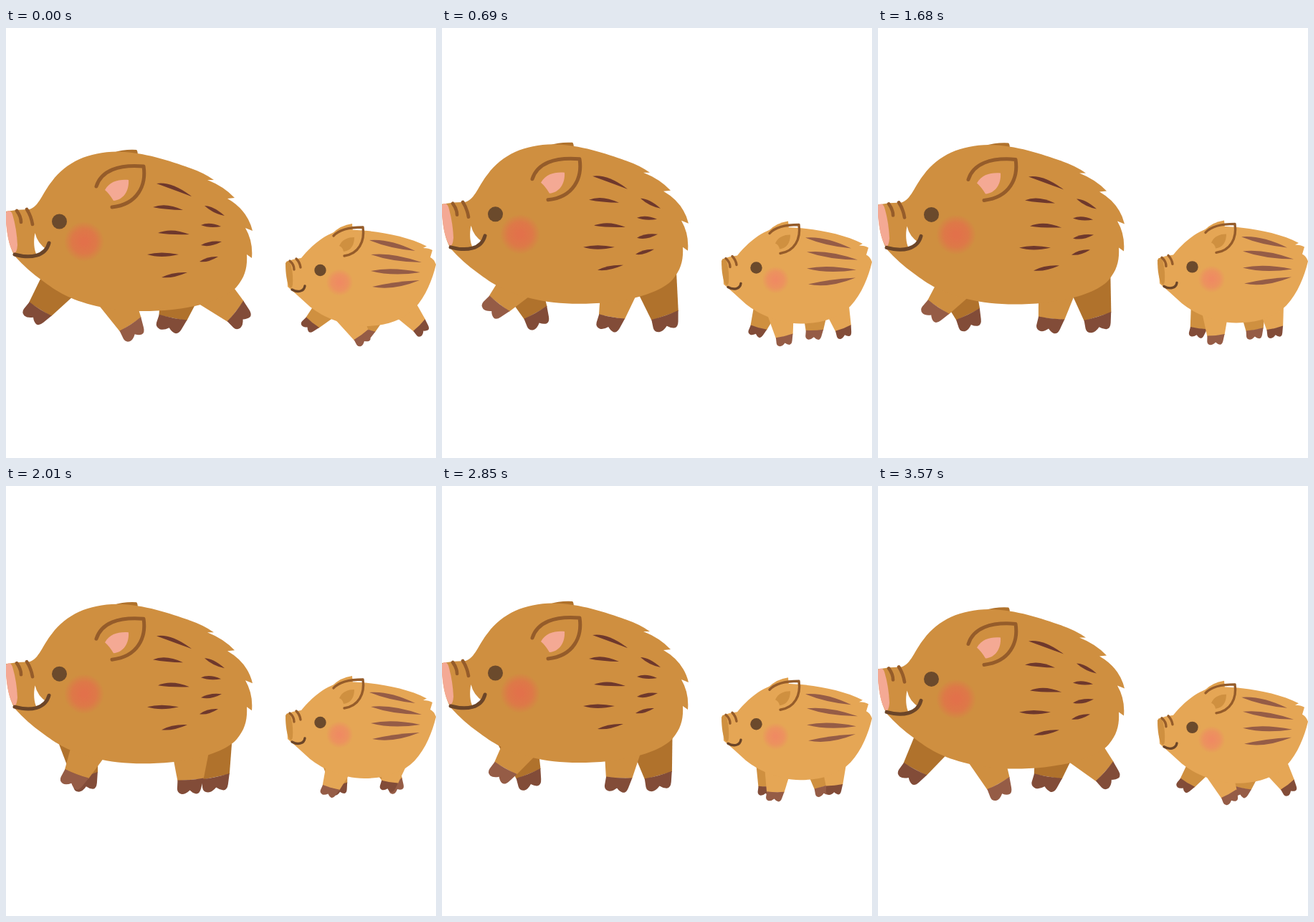
Recreate the animation shown at these times as an HTML page. Size 600 px wide and 600 px high, loop 3600 ms.

```html
<!DOCTYPE html>
<html lang="en">
<head>
<meta charset="utf-8">
<title>Walking boars</title>
<style>
  html, body { margin: 0; width: 100%; height: 100%; overflow: hidden; background: #fff; }
  svg { display: block; width: 100vw; height: 100vh; }
  .line { fill: none; stroke: #955c2a; stroke-linecap: round; stroke-linejoin: round; }
  .mouth { stroke: #6b4528; }
</style>
</head>
<body>
<svg viewBox="0 0 600 600">
  <defs>
    <radialGradient id="blushBig">
      <stop offset=".15" stop-color="#e2714a"/>
      <stop offset=".6" stop-color="#e2714a" stop-opacity=".75"/>
      <stop offset="1" stop-color="#e2714a" stop-opacity="0"/>
    </radialGradient>
    <radialGradient id="blushSmall">
      <stop offset=".1" stop-color="#ef8a62"/>
      <stop offset=".6" stop-color="#ef8a62" stop-opacity=".7"/>
      <stop offset="1" stop-color="#ef8a62" stop-opacity="0"/>
    </radialGradient>
  </defs>

  <g id="parent">
    <g class="legs"></g>
    <path fill="#b0722c" d="M150 174Q164 169 182 170Q184 171 184 180L152 180Z"/>
    <path fill="#cf8f40" d="M0 256Q16 253 33 253C46 249 51 230 64 214C84 187 115 173 155 172.500
      C193 173 230 186 257 195.500Q276 202 290 212L281 212Q304 221 319 237L309 238Q337 254 344 283L334 279
      Q345 298 343 321L336 316C337 333 334 347 322 361C306 379 268 389 232 393C190 397 154 395 126 388
      C88 379 70 367 50 352Q30 338 12 318C4 304 0 285 0 256Z"/>
    <path fill="#f4a994" d="M0 257Q6 252 9 260Q15 280 16 303Q15 315 11 314Q3 304 0 272Z"/>
    <g class="line" stroke-width="4.6">
      <path d="M15 255Q21 263 21 271M29 253Q35 262 37 274"/>
      <path stroke-width="5" d="M126 221C133 199 157 190 192 193C196 219 184 246 148 250"/>
    </g>
    <path fill="#f4a994" d="M138 226C145 214 157 211 171 212C172 227 164 240 150 241Q144 231 138 226Z"/>
    <circle cx="74.500" cy="270" r="10.500" fill="#6b4a2c"/>
    <circle cx="109" cy="298" r="28" fill="url(#blushBig)"/>
    <path fill="#fff" d="M40.500 286C38 297 39 310 43 317Q52 315 57 309Q44 301 40.500 286Z"/>
    <path class="line mouth" stroke-width="5" d="M12 316C34 322 55 319 60 300"/>
    <g class="stripes" fill="#6e382c"></g>
  </g>

  <g id="child">
    <g class="legs"></g>
    <path fill="#e0a04d" d="M455 287Q467 275 483 273L484 284Z"/>
    <path fill="#e5a655" d="M391 326Q401 322 412 321C423 308 441 288 468 282C494 280 552 286 587 304.500
      L582 307Q590 307 595 310L592 320Q597 322 600 330C595 351 586 374 570 391.500C553 409 528 416 500 416
      C468 416 436 400 421 386Q408 374 393 361Z"/>
    <path fill="#cf9040" d="M390 328Q395 321 398 332Q401 345 400 358Q399 364 396 362Q390 352 390 328Z"/>
    <g class="line" stroke-width="3.4">
      <path d="M396 325Q402 330 402 337M405 322Q410 327 411 334"/>
      <path d="M457 290C465 281 479 278 498 278C501 298 492 315 472 318"/>
    </g>
    <path fill="#cf9040" d="M465 304C469 295 477 292 486 292C486 303 481 311 471 312Q470 306 465 304Z"/>
    <circle cx="438.500" cy="338" r="8.200" fill="#6b4a2c"/>
    <circle cx="465.500" cy="355" r="19" fill="url(#blushSmall)"/>
    <path class="line mouth" stroke-width="3.400" d="M399 365C408 370 416 367 417 360"/>
    <g class="stripes" fill="#955c46"></g>
  </g>
</svg>
<script>
const LOOP = 3600, STEP = 30;
const DARK = '#824c38', LIGHT = '#955c46';

function add(parent, d, fill) {
  const path = document.createElementNS('http://www.w3.org/2000/svg', 'path');
  path.setAttribute('d', d);
  if (fill) path.setAttribute('fill', fill);
  return parent.appendChild(path);
}

// Hip at the origin, leg pointing down; w is half the hoof width.
function makeLeg(parent, w, length, height, skin, hoof) {
  const group = parent.appendChild(document.createElementNS('http://www.w3.org/2000/svg', 'g'));
  const top = length - 2.8 * height, left = length + w * .16, right = length - w * .16;
  const at = (x, y) => `${x * w} ${length + y * height} `;
  add(group, `M${-w * 1.9} ${top}L${-w} ${left + 1}L${w} ${right + 1}L${w * 1.35} ${top}Z`, skin);
  add(group, `M${-w} ${left}Q${at(0, .1)}${w} ${right}L${at(.86, .6)}
    Q${at(.78, 1)}${at(.5, 1)}Q${at(.25, .98)}${at(0, .78)}
    Q${at(-.3, 1.1)}${at(-.6, 1.1)}Q${at(-.95, 1.06)}${at(-.98, .75)}Z`, hoof);
  return group;
}

// Each leg: hip x, hip y, start angle, swing, half width, length, far side?, hoof colour.
function makeBoar(id, { period, rise, height, skin, farSkin, legs, stripes }) {
  const root = document.getElementById(id);
  const legRoot = root.querySelector('.legs');
  const parts = legs.map(([x, y, start, swing, w, length, far, hoof]) => ({
    x, y, start, swing, node: makeLeg(legRoot, w, length, height, far ? farSkin : skin, hoof)
  }));
  // Stripes: start, end, then the control offsets of the upper and lower edge.
  for (const [x1, y1, x2, y2, up, down] of stripes) {
    const x = x1 + (x2 - x1) * .43, y = y1 + (y2 - y1) * .43;
    add(root.querySelector('.stripes'), `M${x1} ${y1}Q${x} ${y + up} ${x2} ${y2}Q${x} ${y + down} ${x1} ${y1}Z`);
  }
  return time => {
    const u = 1 - Math.abs(1 - 2 * (time % period) / period);
    root.setAttribute('transform', `translate(0 ${-rise * u})`);
    for (const { x, y, start, swing, node } of parts)
      node.setAttribute('transform', `translate(${x} ${y}) rotate(${-start - swing * u})`);
  };
}

const boars = [
  makeBoar('parent', {
    period: 1200, rise: 12, height: 20, skin: '#cf8f40', farSkin: '#b0722c',
    legs: [
      [102, 330, -41, 72, 18, 82, true, DARK],
      [285, 265, -20.5, 36, 19.5, 148, true, DARK],
      [140, 338, 24, -83, 17.5, 82, false, LIGHT],
      [264, 335, 43, -73, 18, 82, false, DARK]
    ],
    stripes: [
      [210, 217, 259, 235, -11, 0], [205, 250, 247, 254, -9, 2], [277, 248, 305, 262, -6, 5],
      [272, 275, 300, 277, -6, 4], [212, 286, 256, 288, -9, 2], [272, 303, 301, 298, -5, 6],
      [197, 316, 241, 316, -5, 6], [270, 326, 296, 319, -5, 5], [217, 348, 253, 341, -5, 5]
    ]
  }),
  makeBoar('child', {
    period: 600, rise: 11.5, height: 13, skin: '#e5a655', farSkin: '#cf9040',
    legs: [
      [460, 382, -48, 78, 11.5, 43, true, DARK],
      [525, 380, -28, 72, 12, 45, true, LIGHT],
      [474, 386, 27, -75, 12, 47, false, LIGHT],
      [550, 378, 36, -78, 11.5, 45, false, DARK]
    ],
    stripes: [
      [507, 296, 571, 311, -9, 5], [509, 316, 580, 327, -8, 6],
      [509, 339, 578, 341, -7, 7], [511, 361, 577, 352, -3, 10]
    ]
  })
];

function draw() {
  const time = Math.floor(performance.now() % LOOP / STEP) * STEP;
  for (const pose of boars) pose(time);
  requestAnimationFrame(draw);
}
draw();
</script>
</body>
</html>
```
